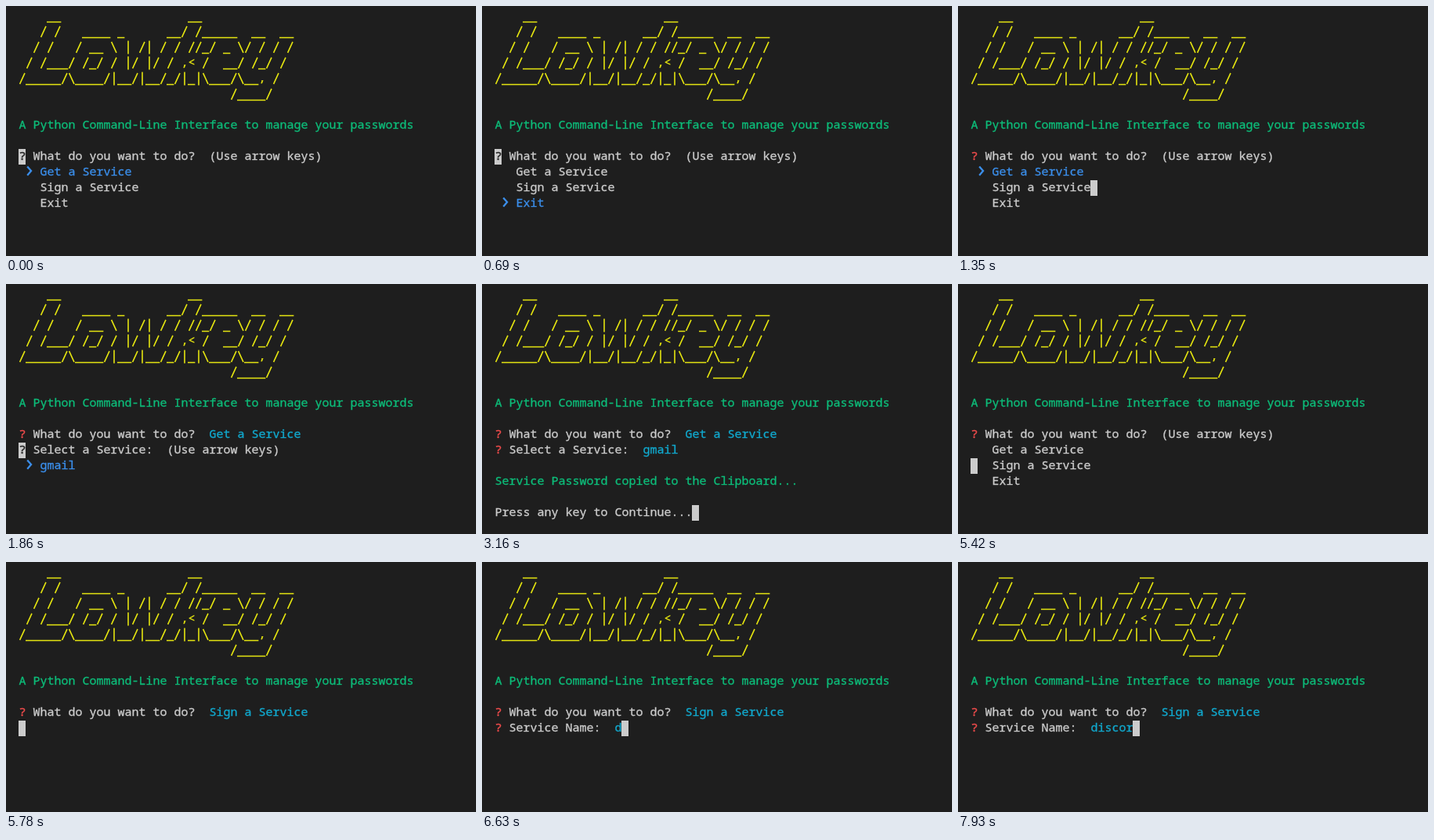
These frames come from a looping animation (600x320 px, 8 s). An HTML page:

```html
<!DOCTYPE html>
<html lang="en">
<head>
<meta charset="utf-8">
<title>Password manager in a terminal</title>
<style>
  html, body { margin: 0; width: 100%; height: 100%; overflow: hidden; background: #1e1e1e; }
  svg { display: block; }
  text {
    font: 15px "Noto Sans Mono", "DejaVu Sans Mono", monospace;
    white-space: pre;
    stroke-width: .35px;
  }
</style>
</head>
<body>
<svg width="600" height="320" viewBox="0 0 600 320">
  <g id="banner"></g>
  <g id="screen"></g>
</svg>
<script>
const LOOP = 8000, CELL = 9, LINE = 20, LEFT = 16, TOP = 3, BASELINE = 14, BEARING = 0.4;
const WHITE = '#cccccc', DARK = '#1e1e1e', RED = '#f14c4c', GREEN = '#0dbc79',
      BLUE = '#3b8eea', CYAN = '#11a8cd', YELLOW = '#e5e510';

const cellX = col => LEFT + col * CELL;
const cellY = row => TOP + row * LINE;

function text(row, col, string, color = WHITE) {
  const safe = string.replace(/</g, '&lt;');
  return `<text x="${cellX(col) + BEARING}" y="${cellY(row) + BASELINE}" ` +
    `fill="${color}" stroke="${color}">${safe}</text>`;
}

function cursor(row, col, char = '') {
  return `<rect x="${cellX(col)}" y="${cellY(row)}" width="${CELL}" height="${LINE}" fill="${WHITE}"/>` +
    text(row, col, char, DARK);
}

// Banner: strokes are placed in character cells.
const BANNER = String.raw`
    __                  __
   / /   ____ _      __/ /_____  __  __
  / /   / __ \ | /| / / //_/ _ \/ / / /
 / /___/ /_/ / |/ |/ / ,< /  __/ /_/ /
/_____/\____/|__/|__/_/|_|\___/\__, /
                              /____/`.split('\n').slice(1);

const STROKES = {
  '/': 'm8 2.8l-6.4 14',
  '\\': 'm1.6 2.8l6.4 14',
  '|': 'm5 1.5v17',
  '_': 'm0 17.5h9.4',
};

function banner() {
  let path = '', letters = '';
  BANNER.forEach((line, row) => [...line].forEach((char, col) => {
    if (STROKES[char]) path += `M${cellX(col)} ${cellY(row)}${STROKES[char]}`;
    else if (char !== ' ') letters += text(row, col, char, YELLOW);
  }));
  return `<path d="${path}" fill="none" stroke="${YELLOW}" stroke-width="1.6"/>${letters}` +
    text(7, 0, 'A Python Command-Line Interface to manage your passwords', GREEN);
}

// Prompts
const ACTIONS = ['Get a Service', 'Sign a Service', 'Exit'];
const HINT = '(Use arrow keys)';

function question(row, prompt, answer = '', color = CYAN) {
  return text(row, 0, '?', RED) + text(row, 2, prompt) + text(row, prompt.length + 4, answer, color);
}

function option(row, label, selected) {
  if (!selected) return text(row, 3, label);
  const pointer = `<path d="M${cellX(1) + 2.2} ${cellY(row) + 2.4}l4.9 5.7l-4.9 5.7" ` +
    `fill="none" stroke="${BLUE}" stroke-width="2.3"/>`;
  return pointer + text(row, 3, label, BLUE);
}

const ask = (answer, color) => question(9, 'What do you want to do?', answer, color);
const waiting = cursor(9, 0, '?');

function menu(selected, caret = waiting) {
  return ask(HINT, WHITE) +
    ACTIONS.map((label, i) => option(10 + i, label, selected.includes(i))).join('') + caret;
}

const getService = ask(ACTIONS[0]);
const gotService = getService + question(10, 'Select a Service:', 'gmail');
const copied = gotService + text(12, 0, 'Service Password copied to the Clipboard...', GREEN) +
  text(14, 0, 'Press any key to Continue...');
const signService = ask(ACTIONS[1]);
const naming = name => signService + question(10, 'Service Name:', name) + cursor(10, 17 + name.length);

const timeline = [
  [0, menu([0])],
  [290, menu([1])],
  [650, menu([], cursor(12, 0))],
  [670, menu([2], '')],
  [690, menu([2])],
  [1150, menu([1, 2], cursor(12, 0))],
  [1170, menu([1])],
  [1320, menu([0, 1], cursor(11, 0))],
  [1350, menu([0], cursor(11, 17))],
  [1370, menu([0])],
  [1810, getService + cursor(10, 0)],
  [1860, getService + question(10, 'Select a Service:', HINT, WHITE) +
    option(11, 'gmail', true) + cursor(10, 0, '?')],
  [3130, gotService + cursor(11, 0)],
  [3160, copied + cursor(14, 28)],
  [4800, copied + cursor(15, 0)],
  [4840, cursor(9, 0)],
  [4880, menu([0])],
  [5420, menu([], cursor(11, 0))],
  [5450, menu([1], '')],
  [5470, menu([1])],
  [5760, menu([1], cursor(10, 0))],
  [5780, signService + cursor(10, 0)],
  [5800, signService + question(10, 'Service Name:')],
  [5830, naming('')],
  [6630, naming('d')],
  [6810, naming('di')],
  [7580, naming('dis')],
  [7740, naming('disc')],
  [7840, naming('disco')],
  [7930, naming('discor')],
];

const screen = document.getElementById('screen');
let shown;

function draw(now) {
  const time = now % LOOP;
  const current = timeline.findLast(([start]) => start <= time)[1];
  if (current !== shown) screen.innerHTML = shown = current;
  requestAnimationFrame(draw);
}

document.getElementById('banner').innerHTML = banner();
draw(0);
</script>
</body>
</html>
```
